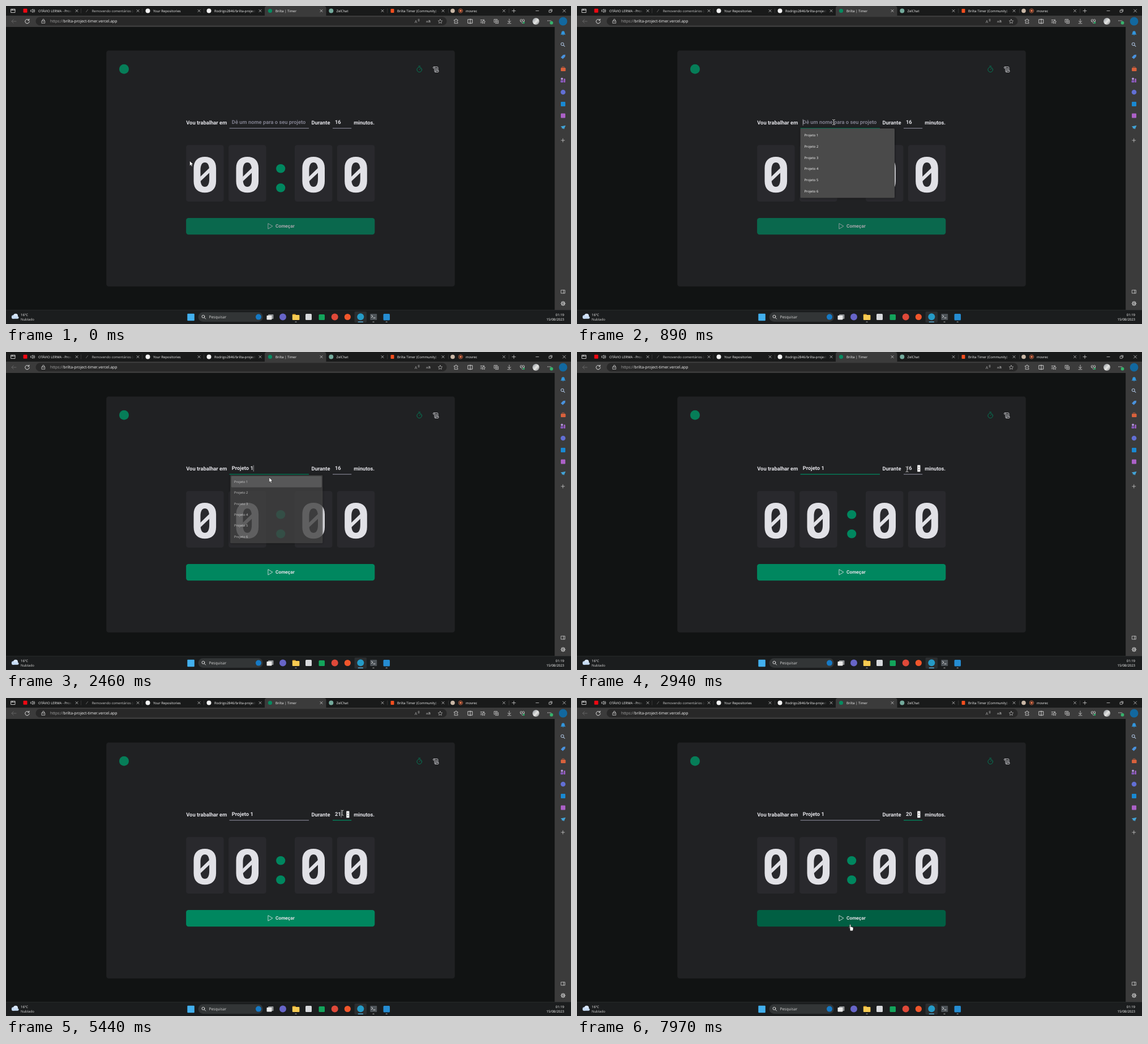
These frames come from a looping animation (998x561 px, 8 s). An HTML page with a canvas:

```html
<!DOCTYPE html>
<html lang="pt-BR">
<head>
<meta charset="utf-8">
<title>Brilta | Timer</title>
<style>
html, body { margin: 0; width: 100%; height: 100%; overflow: hidden; background: #111313; }
canvas { display: block; width: 100vw; height: 100vh; }
</style>
</head>
<body>
<canvas id="stage"></canvas>
<script>
const W = 998, H = 561, LOOP = 8000;
const canvas = document.getElementById('stage');
const ctx = canvas.getContext('2d');
const dpr = window.devicePixelRatio || 1;
canvas.width = Math.round(W * dpr);
canvas.height = Math.round(H * dpr);
ctx.scale(dpr, dpr);
ctx.textRendering = 'geometricPrecision';

const UI = '"Open Sans", "Noto Sans", sans-serif';
const BODY = 'bold 9.36px Roboto, sans-serif';
const GREEN = '#00875f', GRAY = '#7c7c8a', LIGHT = '#e1e1e6', CHROME = '#3b3b3b';

function box(x, y, w, h, color, r = 0) {
  ctx.fillStyle = color;
  ctx.beginPath();
  ctx.roundRect(x, y, w, h, r);
  ctx.fill();
}
function dot(x, y, r, color) {
  ctx.fillStyle = color;
  ctx.beginPath();
  ctx.arc(x, y, r, 0, 7);
  ctx.fill();
}
function text(s, x, y, font, color, align = 'left') {
  ctx.font = font;
  ctx.fillStyle = color;
  ctx.textAlign = align;
  ctx.fillText(s, x, y);
}
function ui(s, x, y, size = 5.95, color = '#fff', align) {
  text(s, x, y, `${size}px ${UI}`, color, align);
}
function widthOf(s) {
  ctx.font = BODY;
  return ctx.measureText(s).width;
}
function icon(x, y, d, color = '#e4e4e4', w = 0.7, fill) {
  const p = new Path2D(d);
  ctx.save();
  ctx.translate(x, y);
  ctx.lineJoin = ctx.lineCap = 'round';
  if (fill) { ctx.fillStyle = fill; ctx.fill(p); }
  if (w) { ctx.strokeStyle = color; ctx.lineWidth = w; ctx.stroke(p); }
  ctx.restore();
}

const ring = r => `M${r} 0A${r} ${r} 0 1 1 ${-r} 0A${r} ${r} 0 1 1 ${r} 0Z`;
const CROSS = 'M-2-2L2 2M2-2L-2 2';
const PLUS = 'M-3 0H3M0-3V3';
const LENS = 'M1.6-.8A2.4 2.4 0 1 1-3.2-.8A2.4 2.4 0 1 1 1.6-.8ZM1 1L3.4 3.4';
const STAR = 'M0-3.6L1.1-1.2L3.7-.9L1.8.9L2.3 3.5L0 2.2L-2.3 3.5L-1.8.9L-3.7-.9L-1.1-1.2Z';

function tab(x, label, end, color = '#f4f4f4') {
  const fade = ctx.createLinearGradient(end - 10, 0, end, 0);
  fade.addColorStop(0, color);
  fade.addColorStop(1, 'transparent');
  ctx.save();
  ctx.beginPath();
  ctx.rect(x, 0, end - x, 17);
  ctx.clip();
  ui(label, x, 10.5, 5.95, fade);
  ctx.restore();
}

function tabStrip() {
  box(0, 0, W, 18, '#191a1a');
  box(457, 0, 108.5, 18, CHROME, [4, 4, 0, 0]);
  for (const x of [132, 240.5, 349, 673.5, 781.5, 888]) box(x, 4.5, 0.6, 8, '#4a4a4a');
  icon(12.5, 8.5, 'M-3.5-3H3.5V3H-3.5ZM-3.5-1.2H3.5M-1.2-1.2V-3', '#eee', 0.8);
  box(30.5, 4.8, 7, 7, '#f00812', 1);
  icon(47, 8.5, 'M-3-1.3H-1.5L.5-3V3L-1.5 1.3H-3ZM2-1.5Q3 0 2 1.5M3-2.7Q5 0 3 2.7');
  tab(57, 'OTÁVIO LERMA - Prosa', 119);
  icon(143, 8.5, 'M-1.5 2L1.5-2', '#777', 0.8);
  tab(151.7, 'Removendo comentários (a', 229, '#c9c9c9');
  dot(250.5, 8.5, 4, '#f4f4f4');
  tab(260, 'Your Repositories', 330);
  dot(358.5, 8.5, 4, '#f4f4f4');
  tab(368, 'Rodrigo2846/brilta-project', 444);
  dot(466.5, 8.5, 3.6, '#078b60');
  tab(476, 'Brilta | Timer', 540);
  dot(574.3, 8.5, 4, '#74aa9c');
  tab(583.5, 'ZelChat', 650);
  box(679.5, 5, 6, 7, '#f24e1e', 1);
  tab(691, 'Brilta Timer (Community) – F', 767);
  dot(789, 8.5, 3.8, '#c9b7a6');
  icon(803, 8.5, ring(3.6), '#e8734a', 0.8);
  dot(803, 8.5, 2, '#e8734a');
  tab(812, 'movrec', 860);
  for (const x of [125, 233, 341, 449, 557, 665, 772, 879.5]) icon(x, 8.5, CROSS);
  icon(897, 8.5, PLUS);
  icon(938.5, 8.5, 'M-2.5 0H2.5');
  icon(962, 8.5, 'M-2.5-1H1.2V2.6H-2.5ZM-1-2.4H2.6V1.2');
  icon(986, 8.5, 'M-2.5-2.5L2.5 2.5M2.5-2.5L-2.5 2.5');
}

function toolbar() {
  box(0, 17, W, 20, CHROME);
  box(52.5, 19.3, 726, 15, '#282828', 7.5);
  icon(14, 27, 'M4 0H-4M-.8-3.2L-4 0L-.8 3.2', '#6d6d6d', 0.8);
  icon(37.5, 27, 'M3-2A3.7 3.7 0 1 0 3.7.3M3.4-4V-1.8H1', '#eee', 0.9);
  icon(66, 27, 'M-2.7-1H2.7V3.3H-2.7ZM-1.5-1V-2.3A1.5 1.5 0 0 1 1.5-2.3V-1M0 .8V1.4');
  ui('https://', 78, 29.3, 6.85, '#a8a8a8');
  ctx.font = `6.85px ${UI}`;
  ui('brilta-project-timer.vercel.app', 78 + ctx.measureText('https://').width, 29.3, 6.85);
  ui('A', 721.8, 29.6, 7, '#aaa');
  icon(728, 25, 'M0-1.5Q1.3 0 0 1.5M1.4-2.3Q3 0 1.4 2.3', '#aaa');
  ui('aあ', 742, 29, 5.5, '#c4c4c4');
  icon(767, 27, STAR, '#bbb');
  icon(795, 27, 'M-3-2.5H-1Q-1.4-4.2 0-4.2T1-2.5H3V-.6Q1.2-1 1.2.4T3 1.6V3.6H-3V1.6Q-1.3 1.6-1.3.4T-3-.6Z');
  icon(820, 27, 'M-3.8-3.3H3.8V3.3H-3.8ZM0-4.2V4.2', '#eee', 0.8);
  icon(842, 27, 'M-3.8-2.5H.2M-3.8 0H-1.2M-3.8 2.5H-1.5M2-3L3 0L4.5.4L3 1.6L3.4 3.7L1.5 2.6L-.4 3.7L0 1.6L-1 .4L1 0Z');
  icon(866, 27, 'M-3.5-3.5H1.8V1.8H-3.5ZM3.6-1.5V3.6H-1.5M-.8-2.2V.6M-2.2-.8H.6');
  icon(889, 27, 'M0-4V2M-2.7-.6L0 2L2.7-.6M-3 3.8H3');
  icon(912, 26.5, 'M0 3.8L-3.6.3Q-4.6-3.1-2-3.1Q-.6-3.1 0-1.6Q.6-3.1 2-3.1Q4.6-3.1 3.6.3ZM-3.5.2H-1L0-1.2L1 1.2L1.6.2H3.5');
  dot(914.5, 29.5, 1.8, '#2fa566');
  const face = ctx.createLinearGradient(930, 22, 942, 34);
  face.addColorStop(0, '#8f969c');
  face.addColorStop(0.5, '#e6e6e4');
  face.addColorStop(1, '#75797c');
  dot(936, 27, 6, face);
  for (const x of [957, 959.5, 962]) dot(x, 26, 0.65, '#eee');
  dot(963.5, 29.7, 2.9, '#37b26c');
  dot(984, 27, 7.4, '#12689f');
}

function sidebar() {
  box(969.3, 37, 28.7, 499.5, CHROME);
  icon(984, 48, 'M-3.8 2L-2.7.3V-1.2Q-2.4-3.6 0-3.8Q2.4-3.6 2.7-1.2V.3L3.8 2ZM-1 2.8Q0 4.2 1 2.8', '#3296dd', 0.5, '#3296dd');
  icon(983.5, 68, LENS, '#a4b9d4', 1.1);
  icon(984, 89.5, 'M-4 1L0-3.3L4-3.7L3.6 0L-.5 4Z', 0, 0, '#4a92dd');
  box(980, 109, 8.5, 6, '#d9613c', 1);
  icon(984, 109, 'M-1.8 0V-1.7H1.8V0', '#d9613c', 0.8);
  dot(982, 128.5, 2, '#b695df');
  box(979.5, 131, 5, 4, '#8458b8', 1);
  box(985.2, 128, 2.7, 7, '#9b5dc4', 1);
  dot(984, 152, 4.3, '#626fd4');
  box(980, 169, 8, 8, '#1989d3', 1);
  box(980, 189.5, 8, 8, '#ac61c7', 1);
  icon(984, 214, 'M-4.3-1.5L4.5-3.2L1.5 3.5L-.5 1.5L-2 3V.5Z', 0, 0, '#42a4d8');
  icon(983.7, 237, PLUS, '#ddd');
  icon(984, 504, 'M-3.3-2.8H3.3V2.8H-3.3ZM.9-2.8V2.8');
  icon(984, 524.8, ring(1.3));
  icon(984, 524.8, ring(2.9));
  for (let i = 0; i < 8; i++) {
    const a = i * Math.PI / 4, c = Math.cos(a), s = Math.sin(a);
    icon(984, 524.8, `M${c * 3} ${s * 3}L${c * 3.8} ${s * 3.8}`, '#e4e4e4', 1.1);
  }
}

function taskbar() {
  box(0, 536.3, W, 25, '#1b1d1e');
  box(0, 536.3, W, 0.5, '#333637');
  dot(13, 548.5, 3.2, '#b8d0ef');
  dot(17, 546.8, 4, '#d8e6f8');
  box(10, 547.5, 12.5, 4.3, '#c5daf4', 2.1);
  ui('16°C', 26, 546.8);
  ui('Nublado', 26, 554.6, 5.95, '#d8d8d8');
  box(320.3, 542.7, 12.5, 12.5, '#42b0ee', 1);
  box(339.5, 540.2, 114.5, 16.8, '#323536', 8.4);
  icon(349.2, 548.6, LENS, '#eee', 0.9);
  ui('Pesquisar', 358.4, 551, 6.75, '#d6d6d6');
  dot(446, 548.6, 5, '#1679c4');
  box(463, 544, 9.5, 8, '#8c8f91', 1);
  box(460.5, 546, 9, 7.5, '#e8e8e8', 1);
  dot(489, 548.5, 6, '#6765c8');
  box(505.8, 543.5, 6, 4, '#d99b24', 1);
  box(505.8, 545, 12.6, 9, '#f7cb52', 1);
  box(529, 543, 11, 11, '#d7d9dc', 1.5);
  box(552.5, 544, 10.5, 10, '#13a45b', 1.5);
  dot(580.7, 548.5, 6, '#df4939');
  dot(603.3, 548.5, 5.6, '#f1562b');
  box(615.5, 539, 21.5, 19.5, '#2b2e30', 2);
  dot(626.3, 548.3, 6, '#259bc7');
  box(643.2, 543, 12, 11, '#4d5358', 1);
  icon(648, 547.5, 'M-2.5-2L0 0L-2.5 2M1 2.7H4', '#fff', 0.8);
  box(666.5, 543, 11.5, 11.5, '#258cd2', 1.5);
  for (const x of [512, 649, 672.2]) box(x - 1.6, 556.8, 3.2, 1.2, '#999', 0.6);
  box(621.6, 556.7, 9.4, 1.4, '#62c5f5', 0.7);
  ui('01:19', 986, 546.8, 5.95, '#fff', 'right');
  ui('15/08/2023', 986, 554.6, 5.95, '#fff', 'right');
}

// slashed zero, centred on the origin
const bowl = (w, h) => {
  const a = w * 0.6, b = h * 0.8, c = h * 0.36;
  return `M0 ${-h}C${a} ${-h} ${w} ${-b} ${w} ${-c}V${c}C${w} ${b} ${a} ${h} 0 ${h}` +
    `C${-a} ${h} ${-w} ${b} ${-w} ${c}V${-c}C${-w} ${-b} ${-a} ${-h} 0 ${-h}Z`;
};
const zero = new Path2D(bowl(19.8, 31.6) + bowl(7.8, 21.5));
const slash = new Path2D('M-8.2 3.6L8.2-12V-3.6L-8.2 12Z');

function digit(x) {
  box(x, 245.3, 66.5, 99.8, '#29292d', 4.2);
  ctx.save();
  ctx.translate(x + 33.2, 297.6);
  ctx.fillStyle = LIGHT;
  ctx.fill(zero, 'evenodd');
  ctx.fill(slash);
  ctx.restore();
}

const between = (t, a, b) => t >= a && t < b;

// start, end, steps, target x, y, bend x, y
const moves = [
  [90, 480, 6, 453.5, 196.5, 440, -5],
  [730, 730, 1, 453.5, 205],
  [1960, 2210, 4, 464.8, 221.5, 456, 218],
  [2780, 2940, 3, 583, 207, 530, 224],
  [3250, 3500, 4, 601.5, 201, 592, 201],
  [3670, 3740, 2, 605, 201.5],
  [3990, 4230, 4, 603.7, 201],
  [4400, 4400, 1, 603.7, 200.7],
  [4550, 4640, 2, 603.5, 208],
  [4950, 5110, 3, 602.7, 202],
  [5350, 5660, 5, 580, 203, 592, 203],
  [7470, 7970, 7, 482.6, 399.8, 585, 330]
];

function pointer(t) {
  let x = 324.6, y = 273.6;
  for (const [t0, t1, n, x1, y1, bx = (x + x1) / 2, by = (y + y1) / 2] of moves) {
    if (t < t0) break;
    const gap = (t1 - t0) / Math.max(1, n - 1);
    const k = n > 1 ? Math.min(n, Math.floor((t - t0) / gap + 0.001) + 1) : 1;
    const u = k / n, v = 1 - u;
    x = v * v * x + 2 * u * v * bx + u * u * x1;
    y = v * v * y + 2 * u * v * by + u * u * y1;
  }
  const inside = (a, b, c, d) => x >= a && x <= c && y >= b && y <= d;
  const minutes = inside(577, 195, 610.5, 216);
  const button = inside(318, 374, 651, 403);
  const beam = inside(394.5, 195, 535, 216) || (minutes && x < 602);
  return { x, y, minutes, button, beam };
}

function drawPointer({ x, y, beam, button }) {
  if (beam) {
    const d = 'M-2-4.5Q0-4.5 0-3.6Q0-4.5 2-4.5M0-3.6V3.6M-2 4.5Q0 4.5 0 3.6Q0 4.5 2 4.5';
    icon(x, y, d, '#222', 1.7);
    icon(x, y, d, '#eee', 0.8);
  } else if (button) {
    icon(x, y, 'M-1 .8Q-1-.2 0-.2T1 .8V4Q2 3.2 2.7 4.3Q3.6 3.7 4.2 4.7Q5.2 4.4 5.3 5.8V8Q5.2 9.5 4.3 11H-.2Q-1-.2-2.7 7.2Q-3.2 5.8-1 6.5Z',
      '#111', 0.5, '#fff');
  } else {
    icon(x, y, 'M0 0V8.3L1.9 6.6L3.2 9.4L4.7 8.7L3.4 6H6Z', '#111', 0.5, '#fff');
  }
}

function popup(t) {
  if (!between(t, 890, 2590)) return;
  const fade = t < 2460 ? 0 : t < 2525 ? 1 : 2;
  const size = 1 - fade * 0.02;
  ctx.save();
  ctx.globalAlpha = [1, 0.7, 0.3][fade];
  ctx.translate(477.8, 277.3);
  ctx.scale(size, size);
  ctx.translate(-477.8, -277.3);
  ctx.shadowColor = 'rgba(0,0,0,.5)';
  ctx.shadowBlur = 4 * dpr;
  box(394.5, 216, 166.5, 122.6, '#4a4a4a', 1.5);
  ctx.shadowColor = 'transparent';
  if (t >= 2040) box(396.3, 217.9, 163, 20, '#646464', 1.5);
  for (let i = 0; i < 6; i++) ui(`Projeto ${i + 1}`, 401.4, 230.1 + i * 19.74);
  ctx.restore();
}

const blinks = [
  [890, 1380], [1960, 2460], [2460, 2940], [3415, 3990],
  [4150, 4640], [5110, 5500], [6920, 7470]
];

function form(t, hand) {
  const chosen = t >= 2460, onMinutes = t >= 4150;
  const onProject = t >= 890 && !onMinutes;
  const value = t < 4150 ? '16' : t < 6920 ? '21' : t < 6980 ? '2' : '20';

  text('Vou trabalhar em', 318.2, 208.8, BODY, LIGHT);
  text('Durante', 539.4, 208.8, BODY, LIGHT);
  text('minutos.', 614.2, 208.8, BODY, LIGHT);
  box(394.6, 215.1, 140.4, 1.04, onProject ? GREEN : GRAY);
  box(577, 215.1, 33.2, 1.04, onMinutes ? GREEN : GRAY);
  text(chosen ? 'Projeto 1' : 'Dê um nome para o seu projeto', 398.8, 208.3, BODY, chosen ? LIGHT : GRAY);

  if (between(t, 5500, 6920)) {
    const from = 581 + (t < 5580 ? widthOf('2') : 0);
    box(from, 199.5, 581 + widthOf(value) - from, 11.2, '#0078d7');
  }
  text(value, 581, 208.3, BODY, LIGHT);
  if (hand.minutes || onMinutes) {
    box(601.2, 199.4, 5.2, 11.8, '#f4f4f4', 0.5);
    icon(603.8, 203.1, 'M-1 .7L0-.8L1 .7Z', 0, 0, '#444');
    icon(603.8, 207.6, 'M-1-.7L0 .8L1-.7Z', 0, 0, '#444');
  }
  if (blinks.some(([a, b]) => between(t, a, b))) {
    const x = onMinutes ? 581 + widthOf(value) : 398.8 + (chosen ? widthOf('Projeto 1') : 0);
    box(x, 199.7, 0.6, 11, LIGHT);
  }

  for (const x of [318.1, 393.1, 510, 584.8]) digit(x);
  for (const y of [286.8, 320.7]) {
    ctx.fillStyle = GREEN;
    ctx.beginPath();
    ctx.ellipse(485.2, y, 8.1, 7.7, 0, 0, 7);
    ctx.fill();
  }

  ctx.save();
  ctx.globalAlpha = 1;
  box(318.1, 374, 333.2, 29.2, !chosen ? '#0a684d' : hand.button ? '#015f43' : GREEN, 4.2);
  const ink = chosen ? LIGHT : '#a7a7ac';
  icon(466.5, 388.6, 'M-3.6-4.6V4.6L4.1 0Z', ink, 0.85);
  text('Começar', 476, 391.4, 'bold 8.32px Roboto, sans-serif', ink);
  ctx.restore();
}

function page(t, hand) {
  box(0, 37, 969.3, 499.3, '#111313');
  box(177.2, 78.5, 615.6, 416.2, '#202123', 4.2);
  dot(208.5, 111.3, 8.5, '#067d58');
  icon(730.2, 112.3, ring(4.3) + 'M0 0L2-2M-1.5-6.2H1.5', GREEN, 0.85);
  icon(759.2, 112, 'M-3.4-1.8Q-5-2.3-4.8-3.4Q-4.6-4.6-3.4-4.6H2.6Q3.7-4.5 3.7-3.3V1.8M-3.4-4.6Q-2.1-4.4-2.1-3.2V3.2Q-2 4.5-.8 4.6H4Q5.3 4.3 4.8 1.9H-.5Q.5 3.6-.8 4.6M-.4-1.8H2M-.4 0H2', LIGHT, 0.85);
  form(t, hand);
  popup(t);
}

const start = performance.now();
function frame() {
  const t = (performance.now() - start) % LOOP;
  const hand = pointer(t);
  page(t, hand);
  tabStrip();
  toolbar();
  sidebar();
  taskbar();
  drawPointer(hand);
  requestAnimationFrame(frame);
}
frame();
</script>
</body>
</html>
```
